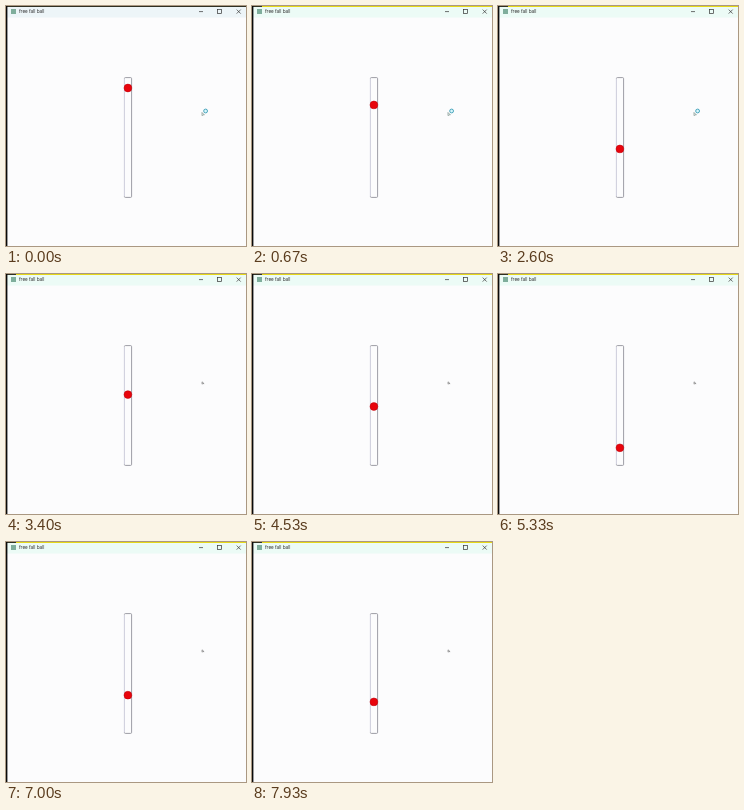
Recreate the animation shown at these times as an HTML page. Size 240x240 px, loop 8000 ms.

```html
<!DOCTYPE html>
<html lang="en">
<head>
<meta charset="utf-8">
<title>free fall ball</title>
<style>
  html, body { margin: 0; width: 100%; height: 100%; overflow: hidden; background: #fcfcfd; }
  svg { display: block; width: 100vw; height: 100vh; }
  text { font: 4.7px "Open Sans", "Noto Sans", sans-serif; fill: #222; }
</style>
</head>
<body>
<svg viewBox="0 0 240 240">
  <rect width="240" height="240" fill="#fcfcfd"/>
  <rect id="bar" width="240" height="11.5" fill="#ecfbf6"/>
  <rect width="240" height="1" fill="#303022"/>
  <rect id="strip" x="10" width="230" height="1" fill="#e6d818"/>
  <rect width="1.4" height="240" fill="#0a0a0a"/>

  <rect x="5" y="3" width="5" height="5" fill="#7fae9c"/>
  <text x="13" y="7.4">free fall ball</text>
  <g fill="none" stroke="#333" stroke-width=".7">
    <path d="M193 5.6h4M230.7 3.6l4 4m0-4l-4 4"/>
    <rect x="211.6" y="3.6" width="3.8" height="3.8"/>
  </g>

  <g fill="none" stroke-width=".8">
    <path d="M118.4 190.5V72.7" stroke="#c2c2d2"/>
    <path d="M118.4 72.5q0-.9 1-.9h5.2q1 0 1 1v117.8q0 1-1 1h-5.2q-1 0-1-.9" stroke="#85858f"/>
  </g>
  <circle id="ball" cx="121.9" cy="82" r="3.9" fill="#e8040c" stroke="#b8000a" stroke-width=".5"/>

  <g id="busy">
    <path d="M196 106.5v3.2l1-.9 1.4.1z" fill="#fff" stroke="#4a6a60" stroke-width=".5"/>
    <circle cx="199.6" cy="105" r="1.9" fill="#d8f6fb" stroke="#3a9db6" stroke-width=".9"/>
  </g>
  <path id="arrow" d="M196 107.8v2.4l.8-.6 1.3 0z" fill="#fff" stroke="#555" stroke-width=".5"/>
</svg>
<script>
  const LOOP = 8000, STEP = 200 / 3;
  const TOP = 82, FLOOR = 188, BOUNCE = 0.956;
  const START = 0.03, REST = 16.8;   // release time, seconds until the ball lies still
  const $ = id => document.getElementById(id);

  // Apex k happens at REST * (1 - BOUNCE^k); gravity follows from that series.
  const drop = FLOOR - TOP;
  const fall = REST * (1 - BOUNCE) / (1 + BOUNCE);
  const halfG = drop / (fall * fall);

  function ballY(sec) {
    const t = Math.max(0, sec - START);
    const guess = Math.floor(Math.log(1 - t / REST) / Math.log(BOUNCE));
    const height = k => {
      const dt = t - REST * (1 - BOUNCE ** k);
      return drop * BOUNCE ** (2 * k) - halfG * dt * dt;
    };
    // Whichever neighbouring arc is above the floor holds the ball.
    return FLOOR - Math.max(0, height(guess), height(guess + 1));
  }

  function draw(ms) {
    const step = Math.floor(ms / STEP + 0.1);
    const t = step * STEP;
    $("ball").setAttribute("cy", ballY(t / 1000).toFixed(2));
    $("bar").setAttribute("fill", step ? "#ecfbf6" : "#edf5f8");
    $("strip").style.display = step ? "" : "none";
    const busy = t < 3000;
    $("busy").style.display = busy ? "" : "none";
    $("arrow").style.display = busy ? "none" : "";
  }

  const begin = performance.now();
  function tick() {
    draw((performance.now() - begin) % LOOP);
    requestAnimationFrame(tick);
  }
  tick();
</script>
</body>
</html>
```
